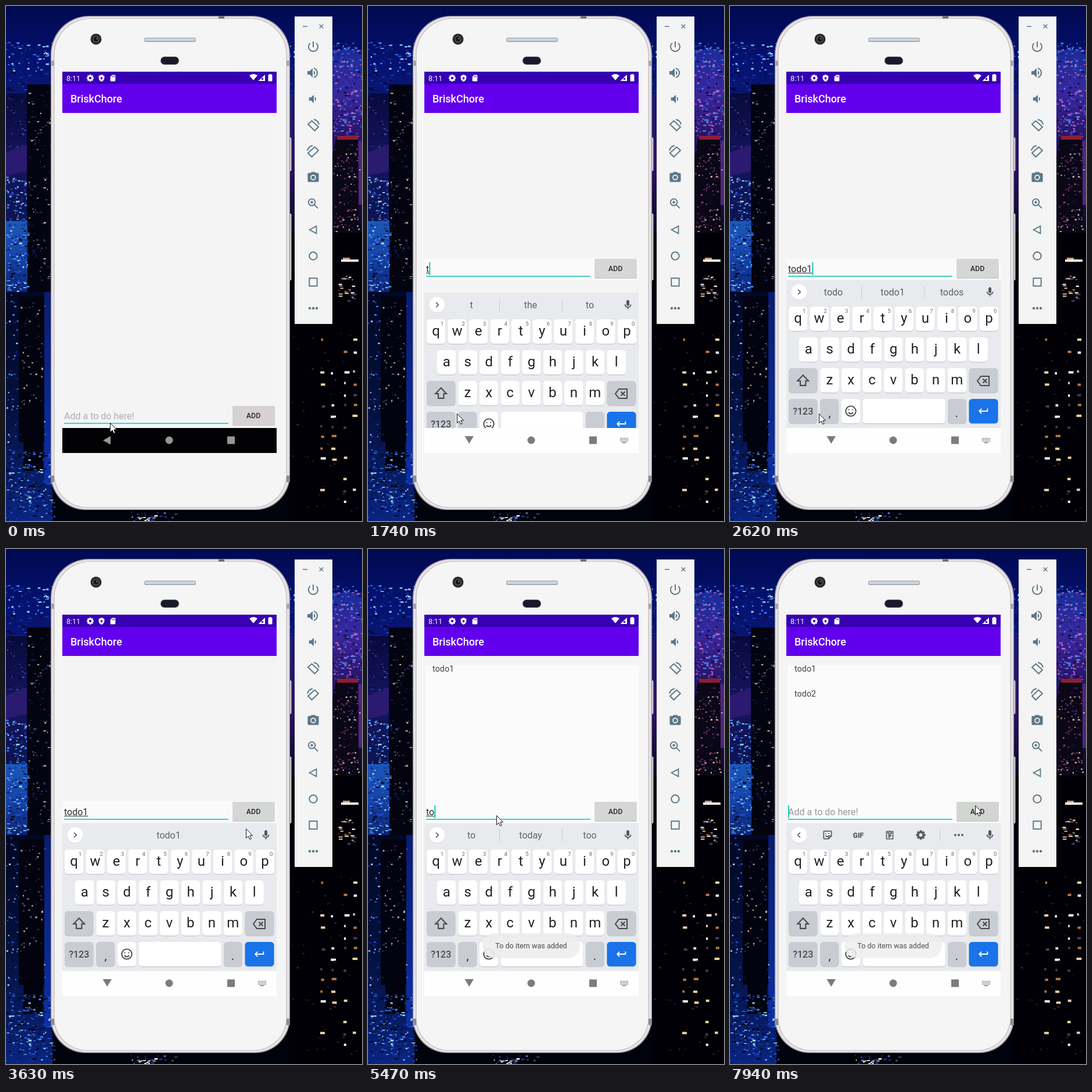
Animation, 613 px wide and 886 px high, one loop 8000 ms. Source, as an HTML page with a canvas:

```html
<!DOCTYPE html>
<html lang="en">
<head>
<meta charset="utf-8">
<title>To-do app demo</title>
<style>
html, body { margin: 0; width: 100%; height: 100%; overflow: hidden; background: #00020c; }
canvas { display: block; }
</style>
</head>
<body>
<canvas id="stage" width="613" height="886"></canvas>
<script>
const W = 613, H = 886, LOOP = 8000;
const stage = document.getElementById('stage');
let g = stage.getContext('2d');

// ---------- drawing helpers ----------
function rect(x, y, w, h, color) {
  g.fillStyle = color;
  g.fillRect(x, y, w, h);
}
function round(x, y, w, h, r, color) {
  g.fillStyle = color;
  g.beginPath();
  g.roundRect(x, y, w, h, r);
  g.fill();
}
function disc(x, y, r, color) {
  g.fillStyle = color;
  g.beginPath();
  g.arc(x, y, r, 0, Math.PI * 2);
  g.fill();
}
function poly(points, color) {
  g.fillStyle = color;
  g.beginPath();
  points.forEach(([x, y]) => g.lineTo(x, y));
  g.closePath();
  g.fill();
}
function text(str, x, y, size, color, weight = 400, align = 'left') {
  g.font = `${weight} ${size}px Roboto, sans-serif`;
  g.textAlign = align;
  g.fillStyle = color;
  g.fillText(str, x, y);
}
// Icon on a 24-unit grid, centred; filled unless a line width is given.
function icon(d, cx, cy, size, color, line = 0) {
  g.save();
  g.translate(cx - size / 2, cy - size / 2);
  g.scale(size / 24, size / 24);
  const path = new Path2D(d);
  if (line) {
    g.lineWidth = line;
    g.strokeStyle = color;
    g.stroke(path);
  } else {
    g.fillStyle = color;
    g.fill(path, 'evenodd');
  }
  g.restore();
}
function gear(cx, cy, r, color, hole) {
  g.save();
  g.translate(cx, cy);
  for (let i = 0; i < 4; i++) {
    rect(-r * 0.24, -r, r * 0.48, r * 2, color);
    g.rotate(Math.PI / 4);
  }
  g.restore();
  disc(cx, cy, r * 0.76, color);
  disc(cx, cy, r * 0.36, hole);
}
function ramp(y0, y1, ...colors) {
  const grad = g.createLinearGradient(0, y0, 0, y1);
  colors.forEach((c, i) => grad.addColorStop(i / (colors.length - 1), c));
  return grad;
}
function random(seed) {
  return () => {
    seed = (seed * 16807) % 2147483647;
    return seed / 2147483647;
  };
}

// ---------- icon shapes ----------
const ICON = {
  power: 'M13 3h-2v10h2V3zm4.83 2.17l-1.42 1.42C17.99 7.86 19 9.81 19 12c0 3.87-3.13 7-7 7s-7-3.13-7-7c0-2.19 1.01-4.14 2.58-5.42L6.17 5.17C4.23 6.82 3 9.26 3 12c0 4.97 4.03 9 9 9s9-4.03 9-9c0-2.74-1.23-5.18-3.17-6.83z',
  quiet: 'M3 9v6h4l5 5V4L7 9zM14 8a4.5 4.5 0 0 1 0 8z',
  loud: 'M3 9v6h4l5 5V4L7 9zM14 8a4.5 4.5 0 0 1 0 8zM14 3.2v2.1a7 7 0 0 1 0 13.4v2.1a9 9 0 0 0 0-17.6z',
  camera: 'M9 2L7.2 4H4a2 2 0 0 0-2 2v12a2 2 0 0 0 2 2h16a2 2 0 0 0 2-2V6a2 2 0 0 0-2-2h-3.2L15 2zM12 7a5 5 0 1 1 0 10a5 5 0 1 1 0-10zM12 8.8a3.2 3.2 0 1 0 0 6.4a3.2 3.2 0 1 0 0-6.4z',
  zoom: 'M9.5 3.5a6 6 0 1 0 .01 0M14 14l6.5 6.5M9.5 6.8v5.4M6.8 9.5h5.4',
  turn: 'M9.5 4.5L21 15L14.5 21.5L3 10.5zM13 2.2a11 11 0 0 1 9 8.5',
  mic: 'M12 14a3 3 0 0 0 3-3V5a3 3 0 0 0-6 0v6a3 3 0 0 0 3 3zM17 11a5 5 0 0 1-10 0H5a7 7 0 0 0 6 6.9V21h2v-3.1A7 7 0 0 0 19 11z',
  shield: 'M12 1L3 5v6c0 5.5 3.8 10.7 9 12c5.2-1.3 9-6.5 9-12V5zM12 7l1.5 3.5l3.5.5l-2.6 2.4L15 17l-3-2l-3 2l.6-3.6L7 11l3.5-.5z',
  card: 'M10 2L4 8v12a2 2 0 0 0 2 2h12a2 2 0 0 0 2-2V4a2 2 0 0 0-2-2zM10 5h1.5v4H10zM13 5h1.5v4H13zM16 5h1.5v4H16z',
  wifi: 'M12 21L0 7a18 18 0 0 1 24 0z',
  shift: 'M12 3L3 12.5h4.5V20h9v-7.5H21z',
  erase: 'M22 4H8L2 12l6 8h14zM11.5 8.5l7 7M18.5 8.5l-7 7',
  enter: 'M20 7v5H5M9 7.5L4.5 12L9 16.5',
  smile: 'M12 3a9 9 0 1 0 .01 0M8 14a4.3 4.3 0 0 0 8 0M8.5 8.5v2M15.5 8.5v2',
  sticker: 'M5 4h14a1 1 0 0 1 1 1v9l-6 6H5a1 1 0 0 1-1-1V5a1 1 0 0 1 1-1zM20 14h-6v6M8 13a4 4 0 0 0 5 2M8.5 8v2M14.5 8v2',
  clip: 'M5 4.5h14v16H5zM8 4v4h8V4M12 2v3M8.5 11.5h7M8.5 14h7M8.5 17h5',
  right: 'M9.5 6.5L15 12l-5.5 5.5',
  left: 'M14.5 6.5L9 12l5.5 5.5'
};

// ---------- backdrop ----------
const BLUES = ['#1f4fd0', '#3f8cf5', '#9fdcff', '#182a90', '#0b1a60'];
const WARM = ['#ffffff', '#f0d2a8', '#b87545', '#4a3a58'];
const NEON = ['#5a3ac0', '#b060d0', '#2840c0', '#d070a8', '#140c48'];
const DIM = ['#24306a', '#48506a', '#101c58', '#b8aca4'];

function lights(seed, x, y, w, h, count, colors, size = 4) {
  const rnd = random(seed);
  for (let i = 0; i < count; i++) {
    const px = x + rnd() * w, py = y + rnd() * h;
    rect(px, py, 1 + rnd() * size, 1 + rnd() * 2, colors[Math.floor(rnd() * colors.length)]);
  }
}

function drawCity() {
  rect(0, 0, W, H, ramp(0, 400, '#00094f', '#051272', '#0c1a70', '#160f50', '#060624'));
  lights(11, 0, 62, W, 50, 620, BLUES, 5);
  lights(13, 0, 112, W, 40, 260, ['#1a2a90', '#080c40', '#2c50c0', '#04062c'], 8);
  rect(0, 400, W, H - 400, '#00020c');

  // left bank
  rect(0, 150, 38, 220, ramp(150, 370, '#080a3c', '#15145c', '#0c1450'));
  lights(17, 0, 150, 38, 95, 60, ['#04062c', '#182c90', '#3a50a8', '#0a1050']);
  poly([[0, 252], [37, 238], [37, 284], [0, 292]], '#2a1a70');
  lights(23, 0, 292, 38, 78, 110, BLUES);
  rect(36, 135, 44, 360, '#03040f');
  lights(31, 38, 140, 40, 340, 110, DIM);
  rect(0, 370, 37, 122, ramp(370, 492, '#1c58b8', '#1644a8', '#0c2470'));
  lights(41, 0, 372, 36, 118, 170, [...BLUES, '#02061c'], 5);
  rect(0, 492, 80, 394, ramp(492, 886, '#020824', '#04103c', '#0a2480'));
  rect(66, 492, 14, 330, ramp(492, 822, '#0a1c70', '#0c30a8'));
  rect(22, 500, 44, 250, '#02030e');
  lights(47, 0, 495, 22, 270, 70, [...BLUES, '#000414'], 3);
  lights(59, 24, 505, 42, 245, 80, DIM, 3);
  rect(30, 690, 34, 110, '#02030e');
  lights(53, 0, 765, 82, 118, 300, [...BLUES, '#00020c', '#020a30'], 5);
  rect(95, 868, W, 18, '#00020c');
  lights(61, 215, 869, 75, 16, 30, ['#ffffff', '#203080', '#6a80b0'], 5);

  // right bank
  rect(488, 150, 125, 240, ramp(150, 390, '#1a1a70', '#2a1464', '#0a0824'));
  rect(562, 75, 51, 150, ramp(75, 225, '#1a2c98', '#38269c', '#281468'));
  lights(67, 562, 70, 50, 155, 240, [...NEON, '#3f8cf5'], 5);
  poly([[568, 228], [576, 222], [606, 224], [608, 390], [562, 390], [562, 260]], '#0a0716');
  rect(570, 223, 36, 7, '#901c34');
  rect(607, 232, 6, 110, '#52247c');
  lights(71, 563, 236, 46, 152, 120, ['#5a3070', '#e0b0a0', '#28185c', '#90405c'], 3);
  rect(488, 390, 125, 496, '#000006');
  rect(577, 436, 30, 4, '#f8f4ee');
  rect(580, 433, 12, 3, '#c8a080');
  lights(73, 572, 462, 24, 44, 24, WARM, 8);
  const rnd = random(977);
  for (let y = 571; y < 850; y += 18.5) {
    for (const x of [541, 559, 580, 596]) {
      if (rnd() < 0.5) rect(x + rnd() * 3, y + rnd() * 5, 3 + rnd() * 6, 4, WARM[Math.floor(rnd() * 4)]);
    }
  }
  lights(79, 492, 560, 118, 310, 40, ['#2a1830', '#402820', '#182048'], 3);
}

// ---------- phone and side panel ----------
function drawPhone() {
  round(486, 226, 5.5, 58, 2, '#c9c5c9');
  round(486, 357, 5.5, 115, 2, '#c9c5c9');
  round(77, 17, 412, 850, [66, 66, 60, 60], '#a9a3a8');
  round(78.5, 18.5, 409, 847, [65, 65, 59, 59], '#e9e5e8');
  round(82, 21, 402, 842, [63, 63, 57, 57], '#c4bec3');
  round(83.5, 22, 399, 840, [62, 62, 56, 56], '#f5f5f5');
  rect(366, 17.5, 10, 4, '#6e6a74');
  for (const x of [77, 483]) {
    rect(x, 94, 6, 9, '#a8a4a8');
    rect(x, 808, 6, 11, '#8e8a8e');
  }
  disc(155, 57, 9.5, '#2a2a2d');
  disc(155, 57, 6, '#4c4c50');
  disc(155, 57, 4, '#15151a');
  disc(156.5, 56, 1.5, '#62626a');
  round(238, 54.5, 89, 7.5, 3, '#a9abb4');
  round(239, 56, 87, 4, 2, '#ccd8e2');
  round(266, 87, 32, 14, 7, '#55525a');
  round(267, 88, 30, 12, 6, '#181a2c');
}

function drawPanel() {
  const c = '#5d7888';
  rect(497, 18, 65, 529, '#f4f4f4');
  rect(511, 34.5, 8, 1.5, c);
  icon('M4 4L20 20M20 4L4 20', 543, 35, 10, c, 3.5);
  icon(ICON.power, 529, 70, 24, c);
  icon(ICON.loud, 528, 115, 24, c);
  icon(ICON.quiet, 530, 160, 22, c);
  icon(ICON.turn, 529, 205, 24, c, 2);
  g.save();
  g.translate(1058, 0);
  g.scale(-1, 1);
  icon(ICON.turn, 529, 250, 24, c, 2);
  g.restore();
  icon(ICON.camera, 529, 295, 23, c);
  icon(ICON.zoom, 529, 340, 23, c, 2);
  icon('M18 5v14L5 12z', 529, 385, 22, c, 2);
  icon('M12 5a7 7 0 1 0 .01 0', 529, 430, 23, c, 2);
  icon('M5 5h14v14H5z', 529, 475, 23, c, 2);
  for (const x of [523, 529, 535]) disc(x, 520, 2.2, c);
}

function drawBars() {
  rect(97, 113, 369, 21, '#3700b3');
  rect(97, 134, 369, 50, '#6200ee');
  text('8:11', 104, 129, 12.5, '#fff');
  gear(145, 124, 6, '#fff', '#3700b3');
  icon(ICON.shield, 164.5, 124, 13, '#fff');
  icon(ICON.card, 184, 124, 13, '#fff');
  icon(ICON.wifi, 426, 122.5, 14, '#fff');
  poly([[446, 118], [446, 129], [434.5, 129]], '#fff');
  rect(440, 124, 3, 3, '#3700b3');
  rect(453.5, 117, 3, 2, '#fff');
  round(451.5, 118, 7, 11.5, 1, '#fff');
  text('BriskChore', 111, 166, 18, '#fff', 500);
}

const base = document.createElement('canvas');
base.width = W;
base.height = H;
const screen = g;
g = base.getContext('2d');
drawCity();
drawPhone();
drawPanel();
drawBars();
g = screen;

// ---------- timeline: each step changes part of the state ----------
const START = {
  cursor: [179, 717], hint: '#aeaeae', typed: '', caret: false, keys: false, drop: 0,
  button: '#d6d1d2', words: null, toast: 0, first: 0, second: 0, list: false, navKey: false
};
const STEPS = [
  [120, { cursor: [159, 704] }],
  [270, { cursor: [153, 701], caret: true }],
  [800, { caret: false }],
  [950, { hint: '#a2a2a2' }],
  [1070, { hint: '#999' }],
  [1340, { navKey: true }],
  [1740, { keys: true, drop: 22, typed: 't', caret: true, button: '#d5d7d6', words: ['t', 'the', 'to'] }],
  [1860, { drop: 2, typed: 'to', words: ['to', 'today', 'too'] }],
  [1980, { drop: 0 }],
  [2380, { typed: 'tod', words: ['tod', 'today', 'todd'] }],
  [2500, { typed: 'todo' }],
  [2620, { typed: 'todo1', words: ['todo', 'todo1', 'todos'] }],
  [2870, { words: ['', 'todo1', ''] }],
  [3240, { caret: false }],
  [3360, { cursor: [240, 626] }],
  [3480, { cursor: [326, 543] }],
  [3630, { cursor: [413, 481] }],
  [3780, { cursor: [428, 450], caret: true }],
  [3900, { cursor: [432, 444] }],
  [4170, { button: '#c9cbc9' }],
  [4320, { typed: '', list: true }],
  [4440, { first: 0.07, toast: 0.12 }],
  [4560, { first: 0.4, toast: 0.4, words: null, button: '#d5d7d6' }],
  [4680, { first: 0.8, toast: 0.8, cursor: [300, 452] }],
  [4800, { first: 1, toast: 1, cursor: [221, 458] }],
  [5200, { typed: 't' }],
  [5350, { typed: 'to', words: ['t', 'the', 'to'] }],
  [5470, { words: ['to', 'today', 'too'] }],
  [5620, { typed: 'tod' }],
  [5740, { words: ['tod', 'today', 'todd'] }],
  [6010, { typed: 'todo' }],
  [6130, { words: ['todo', 'today', 'todd'] }],
  [6410, { typed: 'todo2', words: ['', 'todo2', ''], toast: 0.9 }],
  [6530, { toast: 0.7 }],
  [6650, { toast: 0.4 }],
  [6770, { toast: 0 }],
  [6920, { cursor: [371, 452], caret: false }],
  [7070, { cursor: [414, 446] }],
  [7190, { cursor: [422, 441] }],
  [7430, { caret: true, button: '#cfd1cf' }],
  [7670, { typed: '', words: null, second: 0.4 }],
  [7790, { second: 1, toast: 0.5, button: '#d3d5d3' }],
  [7940, { toast: 0.95 }]
];
function stateAt(t) {
  const state = { ...START };
  for (const [time, change] of STEPS) if (time <= t) Object.assign(state, change);
  return state;
}

// ---------- app screen ----------
function drawInput(s) {
  const y = s.keys ? 458 : 711;
  if (s.list) rect(99, 200, 367, 272, '#fbfbfb');
  else if (s.keys) rect(97, 434, 369, 38, '#fafafa');

  rect(100, y + 6, 283, 2, s.keys ? '#45cfc0' : '#30d8dc');
  let end = 100;
  if (s.typed) {
    text(s.typed, 100, y, 16, '#2c2c2c');
    const w = g.measureText(s.typed).width;
    rect(100, y + 1, w, 1, '#2c2c2c');
    end += w;
  } else {
    text('Add a to do here!', 100, y, 16, s.hint);
  }
  if (s.caret) rect(end, y - 17, 2, 22, '#1cc5b4');

  round(390, y - 23, 73, 34, 2, '#c2c2c2');
  round(390, y - 23, 73, 33, 2, s.button);
  text('ADD', 426, y - 2, 12.5, '#2a2a2a', 500, 'center');
}

function drawItems(s) {
  for (const [label, y, alpha] of [['todo1', 211, s.first], ['todo2', 254, s.second]]) {
    g.globalAlpha = alpha;
    text(label, 111, y, 14.4, '#444');
  }
  g.globalAlpha = 1;
}

function drawNav(s) {
  const c = s.keys ? '#7d7b7c' : '#9b9496';
  rect(97, 726, 369, 43, s.keys ? '#fefefe' : '#020204');
  poly(s.keys ? [[166.5, 740], [182, 740], [174.25, 753]] : [[180, 740], [180, 754.5], [167, 747.25]], c);
  disc(281, 747, 6.5, c);
  rect(381, 740.5, 13, 13, c);
  if (!s.navKey) return;
  for (let row = 0; row < 3; row++)
    for (let i = 0; i < 6; i++) rect(434 + i * 2.5, 743 + row * 2.5, 1.5, 1.5, c);
  rect(437.5, 750.5, 7, 1.5, c);
}

// ---------- keyboard ----------
const PITCH = 36.55;
function key(x, y, w, color = '#fff') {
  round(x, y + 1.2, w, 42, 5.5, '#c3c6cb');
  round(x, y, w, 42, 5.5, color);
}
function keyRow(letters, x, y, digits = '') {
  [...letters].forEach((ch, i) => {
    const kx = x + i * PITCH;
    key(kx, y, 32.5);
    text(ch, kx + 16.25, y + 28, 24, '#1f2124', 400, 'center');
    if (digits) text(digits[i], kx + 29.5, y + 11, 9.5, '#66696d', 400, 'right');
  });
}
function drawStrip(words) {
  const c = '#55585c', soft = '#c6c9ce';
  disc(119, 493, 13.5, '#d5d7da');
  disc(119, 492, 13.5, '#fff');
  icon(words ? ICON.right : ICON.left, 119, 492, 18, c, 2.2);
  icon(ICON.mic, 447.5, 492, 20, c);
  if (words) {
    words.forEach((word, i) => text(word, 178 + i * 102, 498, 16, '#5f6266', 400, 'center'));
    if (words[0]) for (const x of [226, 334]) rect(x, 482, 1, 21, soft);
    return;
  }
  icon(ICON.sticker, 168, 492, 20, c, 2);
  text('GIF', 221, 496.5, 12, c, 900, 'center');
  icon(ICON.clip, 275, 492, 19, c, 2);
  gear(328.5, 492, 8, c, '#e8eaed');
  rect(361, 482, 1, 20, soft);
  for (const x of [388, 394, 400]) disc(x, 492, 1.9, c);
}
function drawKeyboard(s) {
  const grey = '#c9ccd2', ink = '#45484c';
  g.save();
  g.beginPath();
  g.rect(97, 470, 369, 256);
  g.clip();
  g.translate(0, s.drop);
  rect(97, 471.5, 369, 256, '#e8eaed');
  drawStrip(s.words);
  keyRow('qwertyuiop', 100.8, 517, '1234567890');
  keyRow('asdfghjkl', 119, 570);
  key(101, 623, 49.5, grey);
  icon(ICON.shift, 125.7, 644.5, 25, ink, 2);
  keyRow('zxcvbnm', 155.3, 623);
  key(411.5, 623, 50, grey);
  icon(ICON.erase, 436, 645, 24, ink, 2);
  key(101, 676, 49.5, grey);
  text('?123', 125.7, 703, 16, ink, 500, 'center');
  key(155.3, 676, 32, grey);
  text(',', 171.5, 707, 20, '#222', 400, 'center');
  key(192, 676, 32);
  icon(ICON.smile, 208, 697, 23, ink, 2);
  key(228.5, 676, 142);
  key(375, 676, 32, grey);
  text('.', 390.5, 707, 20, '#222', 400, 'center');
  key(411.5, 676, 50, '#1a73e8');
  icon(ICON.enter, 436, 697, 22, '#fff', 2);
  g.restore();
}

function drawToast(alpha) {
  if (!alpha) return;
  g.globalAlpha = alpha * alpha * 0.9;
  round(197, 661, 168, 43, 21.5, '#eeeeef');
  g.globalAlpha = alpha;
  text('To do item was added', 281, 687, 12.6, '#47494b', 400, 'center');
  g.globalAlpha = 1;
}

function drawCursor([x, y]) {
  const arrow = new Path2D('M.5 .5V16.5L4.2 13L6.7 18.5L9.2 17.3L6.8 12H11.5Z');
  g.save();
  g.translate(x, y);
  g.fillStyle = '#fff';
  g.fill(arrow);
  g.lineWidth = 1;
  g.strokeStyle = '#111';
  g.stroke(arrow);
  g.restore();
}

function draw(t) {
  const s = stateAt(t);
  g.drawImage(base, 0, 0);
  rect(97, 184, 369, 542, '#f4f4f4');
  drawInput(s);
  drawItems(s);
  if (s.keys) drawKeyboard(s);
  drawNav(s);
  drawToast(s.toast);
  drawCursor(s.cursor);
}

const begin = performance.now();
function frame() {
  draw((performance.now() - begin) % LOOP);
  requestAnimationFrame(frame);
}
frame();
</script>
</body>
</html>
```
